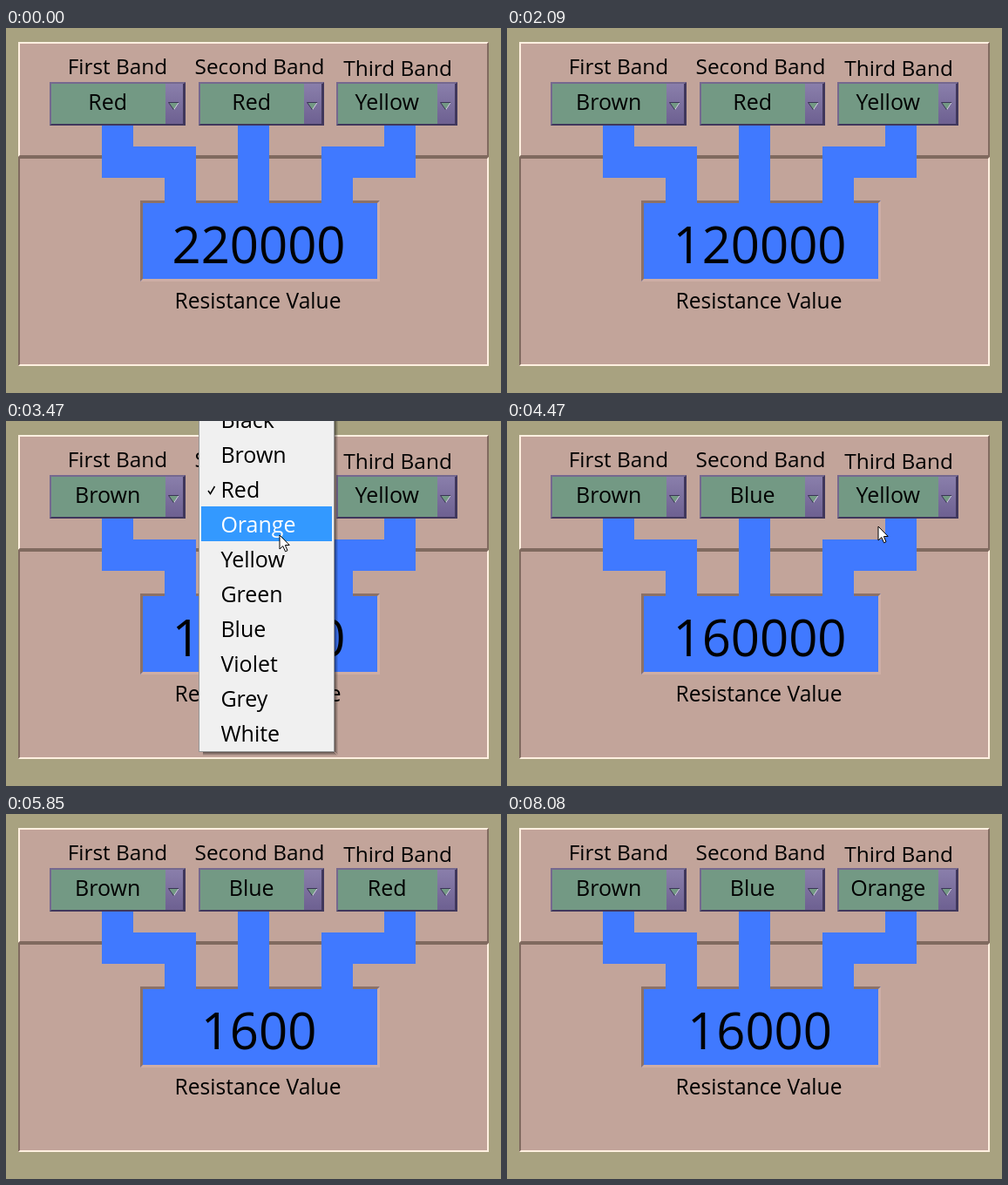
These frames come from a looping animation (568 by 419 pixels, 9410 ms). An HTML page with a canvas:

```html
<!DOCTYPE html>
<html lang="en">
<head>
<meta charset="utf-8">
<title>Resistance Value</title>
<style>
  html, body { margin: 0; width: 100%; height: 100%; overflow: hidden; background: #a8a280; }
  canvas { display: block; }
</style>
</head>
<body>
<canvas id="stage" width="568" height="419"></canvas>
<script>
const W = 568, H = 419, LOOP = 9410, FPS = 13;
const FONT = '"Open Sans", "Noto Sans", sans-serif';
const BLUE = '#4079ff', GREEN = '#739984';
const COLORS = ['Black', 'Brown', 'Red', 'Orange', 'Yellow', 'Green', 'Blue', 'Violet', 'Grey', 'White'];
const ROW = 40, COMBO_MID = 78, MENU_W = 156, BUTTON_W = 23;

const stage = document.getElementById('stage').getContext('2d');
const layer = document.createElement('canvas');
layer.width = W;
layer.height = H;
const sheet = layer.getContext('2d');

const bands = [
  { x: 50, w: 156, label: 'First Band', mid: 128, base: 53 },
  { x: 221, w: 144, label: 'Second Band', mid: 291, base: 53 },
  { x: 379, w: 139, label: 'Third Band', mid: 449.5, base: 55 }
];

// The pointer enters, rests on a box, opens its menu, goes to an item and leaves. Times are in ticks.
const trips = [
  { band: 0, pick: 1, enter: 3, rest: 8, open: 9.6, fade: 5.7, go: 15, done: 22, end: 27, path: [[486, 320], [179, 95], [142, 45]] },
  { band: 1, pick: 6, enter: 31, rest: 35, open: 35.9, fade: 5.7, go: 43, done: 51, end: 52, path: [[143, 45], [320, 95], [297, 240]] },
  { band: 2, pick: 2, enter: 56, rest: 60, open: 60.6, fade: 5.7, go: 67, done: 71, end: 76, path: [[297, 240], [454, 95], [460, 2]] },
  { band: 2, pick: 3, enter: 79, rest: 84, open: 85, fade: 3, go: 90, done: 93, end: 97, path: [[460, 2], [467, 87], [460, 121]] },
  { enter: 101, rest: 104, end: 105, path: [[459, 123], [541, 400]] }
];

function rect(c, color, x, y, w, h) {
  c.fillStyle = color;
  c.fillRect(x, y, w, h);
}

function poly(c, color, ...pts) {
  c.fillStyle = color;
  c.beginPath();
  pts.forEach(([x, y]) => c.lineTo(x, y));
  c.closePath();
  c.fill();
}

function line(c, color, width, ...pts) {
  c.strokeStyle = color;
  c.lineWidth = width;
  c.beginPath();
  pts.forEach(([x, y]) => c.lineTo(x, y));
  c.stroke();
}

function text(c, str, x, y, size = 25, align = 'center', color = '#000') {
  c.font = size + 'px ' + FONT;
  c.textAlign = align;
  c.fillStyle = color;
  c.fillText(str, x, y);
}

function bevel(c, x, y, w, h, b, upper, lower) {
  const r = x + w, d = y + h;
  poly(c, upper, [x, y], [r, y], [r - b, y + b], [x + b, y + b], [x + b, d - b], [x, d]);
  poly(c, lower, [r, d], [x, d], [x + b, d - b], [r - b, d - b], [r - b, y + b], [r, y]);
}

function drawPanels(c) {
  rect(c, '#a8a280', 0, 0, W, H);
  rect(c, '#c2a49a', 14, 16, 540, 372);
  bevel(c, 14, 16, 540, 132, 2, '#fff0e0', '#806a5f');
  bevel(c, 14, 148, 540, 240, 2, '#806a5f', '#fff0e0');
  rect(c, BLUE, 154, 198, 275, 93);
  bevel(c, 154, 198, 275, 93, 3, '#8c7167', '#cfaea4');
}

function drawTubes(c) {
  const bent = [[128, 110], [128, 154], [200, 154], [200, 204]];
  line(c, BLUE, 36, ...bent);
  line(c, BLUE, 36, [284, 110], [284, 204]);
  line(c, BLUE, 36, ...bent.map(([x, y]) => [580 - x, y]));
}

function drawCombo(c, { x, w, label, mid, base }, pick) {
  const bx = x + w - BUTTON_W, mx = bx + 9.5;
  text(c, label, mid, base, 24.4);
  rect(c, GREEN, x, 62, w, 50);
  const shade = c.createLinearGradient(0, 62, 0, 112);
  shade.addColorStop(0, '#8b80ac');
  shade.addColorStop(1, '#6c5f90');
  rect(c, shade, bx, 62, BUTTON_W, 50);
  bevel(c, x, 62, w, 50, 2, '#75688f', '#40375c');
  rect(c, '#40375c', x + w - 3, 64, 1, 46);
  poly(c, GREEN, [mx - 6, 85], [mx + 6, 85], [mx, 94]);
  line(c, '#d0c8e0', 1, [mx + 6, 85], [mx, 94]);
  line(c, '#3a3455', 1, [mx, 94], [mx - 6, 85.5], [mx + 6, 85.5]);
  text(c, COLORS[pick], (x + bx) / 2 + 0.2, 94);
}

function drawMenu(c, x, checked, hotRow) {
  const top = COMBO_MID - ROW / 2 - checked * ROW - 2;
  const h = COLORS.length * ROW + 4;
  c.clearRect(0, 0, W, H);
  for (let i = 0; i < 4; i++) {
    const tone = `rgba(0,0,0,${0.45 - i * 0.12})`;
    rect(c, tone, x + MENU_W + i, top + 5, 1, h - 5 + i);
    rect(c, tone, x + 5, top + h + i, MENU_W - 5 + i, 1);
  }
  rect(c, '#979797', x, top, MENU_W, h);
  rect(c, '#f0f0f0', x + 1, top + 1, MENU_W - 2, h - 2);
  COLORS.forEach((name, i) => {
    const y = top + 2 + i * ROW, hot = i === hotRow;
    const ink = hot ? '#fff' : '#000';
    if (hot) rect(c, '#3399ff', x + 3, y, MENU_W - 6, ROW);
    text(c, name, x + 25.4, y + 30, 25, 'left', ink);
    if (i === checked) line(c, ink, 1.5, [x + 11, y + 22], [x + 13.5, y + 25.5], [x + 18.5, y + 17]);
  });
}

function pointerAt(n, { enter, rest, go, done, path }) {
  const picking = n >= go;
  const [from, to] = picking ? path.slice(1) : path;
  const u = Math.min(1, picking ? (n - go) / (done - go) : (n - enter) / (rest - enter));
  const e = picking ? u : 1 - (1 - u) ** 2.5;
  return from.map((v, i) => Math.round(v + (to[i] - v) * e));
}

function drawPointer(c, [x, y]) {
  const shape = [[0, 0], [0, 16], [3.8, 12.6], [6.5, 18.8], [9, 17.7], [6.4, 11.6], [11.2, 11.4]]
    .map(([px, py]) => [x + px, y + py]);
  poly(c, '#fff', ...shape);
  line(c, '#000', 1, ...shape, shape[0]);
}

function draw(time) {
  const n = Math.floor(time * FPS / 1000 + 0.15), c = stage;
  const picks = [2, 2, 4];
  trips.filter(t => t.pick && n >= t.end).forEach(t => { picks[t.band] = t.pick; });
  const value = (picks[0] * 10 + picks[1]) * 10 ** picks[2];

  drawPanels(c);
  drawTubes(c);
  bands.forEach((band, i) => drawCombo(c, band, picks[i]));
  text(c, String(value), 290, 270, 58);
  text(c, 'Resistance Value', 289, 322, 24.6);

  const trip = trips.find(t => n >= t.enter && n < t.end);
  if (!trip) return;
  const tip = pointerAt(n, trip);
  if (n >= trip.open) {
    const checked = picks[trip.band];
    const row = n >= trip.go ? checked + Math.floor((tip[1] - COMBO_MID + ROW / 2) / ROW) : -1;
    drawMenu(sheet, bands[trip.band].x, checked, row);
    c.globalAlpha = Math.min(1, (n - trip.open) / trip.fade);
    c.drawImage(layer, 0, 0);
    c.globalAlpha = 1;
  }
  drawPointer(c, tip);
}

const start = performance.now();
function tick() {
  draw((performance.now() - start) % LOOP);
  requestAnimationFrame(tick);
}
tick();
</script>
</body>
</html>
```
